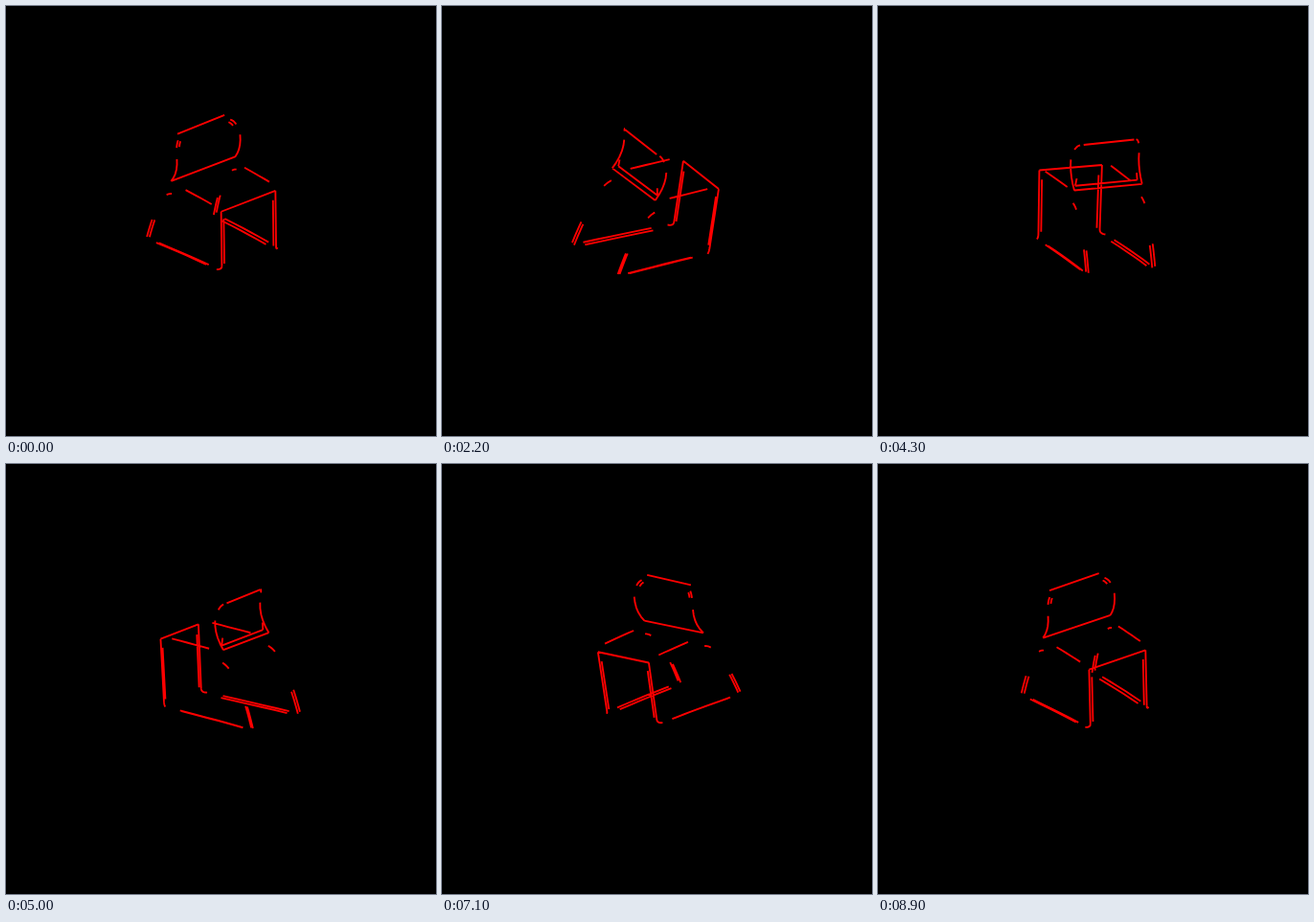
Recreate the animation shown at these times as an HTML page. Size 449 by 449 pixels, loop 9000 ms.

```html
<!DOCTYPE html>
<html lang="en">
<head>
<meta charset="utf-8">
<title>Turning chair</title>
<style>
  html, body { margin: 0; width: 100%; height: 100%; overflow: hidden; background: #000; }
  svg { display: block; width: 100vw; height: 100vh; }
  path { fill: none; stroke: #f00; stroke-width: 1.85; stroke-linejoin: round; }
</style>
</head>
<body>
<svg viewBox="0 0 449 449"><path id="chair"/></svg>
<script>
const LOOP = 9000, STEP = 100, CENTER = 224.5;
const START_DEG = -55, LEAN = 0.0928, SIDE_SHIFT = 2;
const FLATTEN = 0.362, DEPTH = 0.001;
const INSET = 3.3, DROP = 1.3;   // offset of a tube's inner edge

const joint = (forward, side, up) => ({ forward, side, up });
const mix = (a, b, t) => joint(
  a.forward + (b.forward - a.forward) * t,
  a.side + (b.side - a.side) * t,
  a.up + (b.up - a.up) * t);

// Joints of one side of the frame; the other side mirrors them.
const knee = joint(53, 35.6, 37.5);
const ankle = joint(45.6, 35.2, -25);
const toe = joint(41, 39.5, -28.7);
const heel = joint(-76, 43, -28.7);
const hip = joint(-30, 41, 32);
const railFront = joint(53, 37.6, 41.5);
const railRear = joint(-30, 37.6, 41.5);
const backLow = joint(-30, 40.6, 45.3);
const backMid = joint(-17, 40.4, 73);
const backTop = joint(-24, 30, 90);
const lip = joint(-25, 37, 48);

// Tubes are quadratic curves; without a bend they run straight.
const tube = (a, b, bend = mix(a, b, 0.5)) =>
  t => mix(mix(a, bend, t), mix(bend, b, t), t);

const frontLeg = tube(knee, ankle);
const footBend = tube(ankle, toe, joint(45, 35.2, -29));
const runner = tube(toe, heel);
const rearLeg = tube(hip, heel, joint(-52, 41.5, 27));
const rail = tube(railFront, railRear);
const backSide = tube(backLow, backMid, joint(-17, 40.5, 58));
const corner = tube(backMid, backTop, joint(-19, 39, 90));

function piece(curve, from = 0, to = 1) {
  return Array.from({ length: 6 }, (_, i) => curve(from + (to - from) * i / 5));
}
const inner = line => line.map(p => joint(p.forward, p.side - INSET, p.up - DROP));
const mirror = p => joint(p.forward, -p.side, p.up);
const bothSides = lines => lines.flatMap(line => [line, line.map(mirror)]);
const across = p => [mirror(p), p];

const runnerPart = piece(runner, 0.16, 0.87);
const rearLegPart = piece(rearLeg, 0.77, 0.98);

const always = [
  ...bothSides([
    piece(frontLeg), inner(piece(frontLeg, 0.13, 0.95)), piece(footBend),
    runnerPart, inner(runnerPart),
    rearLegPart, inner(rearLegPart), piece(rearLeg, 0, 0.2),
    piece(rail, 0.18, 0.75), piece(backSide), piece(corner, 0.4, 0.8)
  ]),
  across(knee), across(backLow)
];
const fromRear = [
  ...bothSides([piece(tube(lip, backTop), 0, 0.18)]),
  across(lip), across(backTop)
];
const fromFront = [
  ...bothSides([inner(piece(corner, 0.45, 0.75))]),
  across(joint(-27, 30, 93.5))
];

const cosLean = Math.cos(LEAN), sinLean = Math.sin(LEAN);

function project(p, cos, sin) {
  const offset = p.side + SIDE_SHIFT;
  const side = offset * cosLean - p.up * sinLean;
  const height = offset * sinLean + p.up * cosLean;
  const right = p.forward * cos - side * sin;
  const away = p.forward * sin + side * cos;
  const x = CENTER + right * (1 + DEPTH * away);
  const y = CENTER - FLATTEN * away - height * (1 + DEPTH * away / 2);
  return x.toFixed(2) + ' ' + y.toFixed(2);
}

const chair = document.getElementById('chair');

function draw(time) {
  const step = Math.floor((time % LOOP) / STEP);
  const angle = (START_DEG + step * 360 * STEP / LOOP) * Math.PI / 180;
  const cos = Math.cos(angle), sin = Math.sin(angle);
  const lines = always.concat(sin > -0.1 ? fromRear : fromFront);
  chair.setAttribute('d', lines.map(line =>
    'M' + line.map(p => project(p, cos, sin)).join('L')).join(''));
}

const begin = performance.now();
function tick() {
  draw(performance.now() - begin);
  requestAnimationFrame(tick);
}
tick();
</script>
</body>
</html>
```
